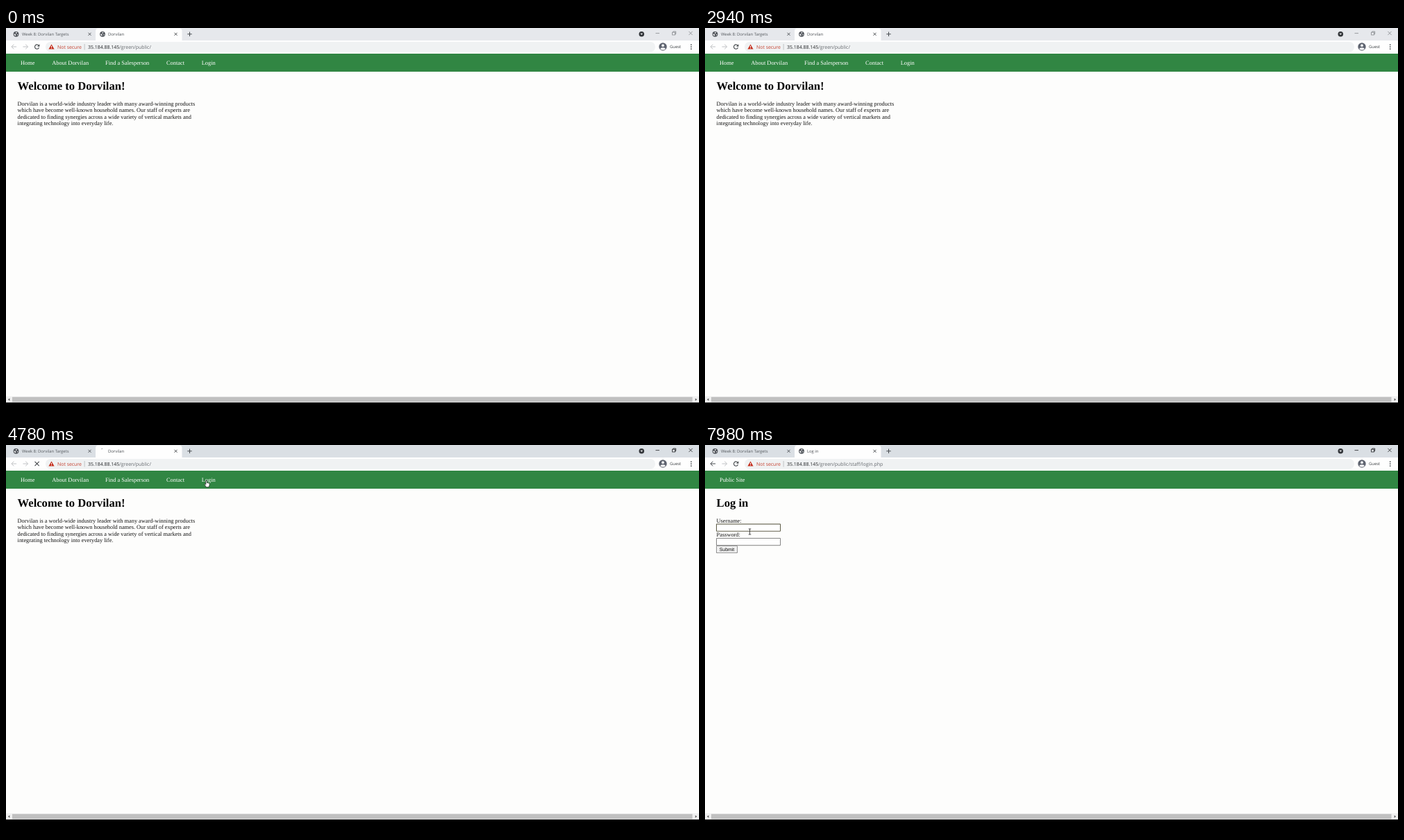
Write an HTML page with a canvas that moves like this. It is 998 px wide and 561 px high and loops after 8000 ms.

```html
<!DOCTYPE html>
<html lang="en">
<head>
<meta charset="utf-8">
<title>Login demo</title>
<style>
  html, body { margin: 0; width: 100%; height: 100%; overflow: hidden; background: #000; }
  canvas { display: block; width: 998px; height: 561px; }
</style>
</head>
<body>
<canvas id="stage" width="998" height="561"></canvas>
<script>
const ctx = document.getElementById('stage').getContext('2d');
ctx.textRendering = 'geometricPrecision';

const LOOP = 8000;
const CLICK = 4700;    // Login is clicked, window takes focus
const LOADED = 5180;   // login page replaces the home page
const HOVER = 6440;    // pointer enters the username field
const BRAND = 'Dorvilan';
const UI = '"Open Sans", "Noto Sans", sans-serif';
const SERIF = '"Liberation Serif", "Times New Roman", serif';
const SANS = '"Liberation Sans", Arial, sans-serif';

// time, x, y of the pointer's hot spot
const PATH = [
  [4400, 330, -10], [4620, 288.5, 51], [5560, 288.5, 51], [6000, 130, 104],
  [6300, 79, 115.5], [6420, 79, 115.5], [6900, 66, 123], [7500, 64.5, 125], [8000, 64.5, 125]
];

function rect(x, y, w, h, fill) {
  ctx.fillStyle = fill;
  ctx.fillRect(x, y, w, h);
}

function round(x, y, w, h, r, fill) {
  ctx.fillStyle = fill;
  ctx.beginPath();
  ctx.roundRect(x, y, w, h, r);
  ctx.fill();
}

function disc(x, y, r, fill) {
  ctx.fillStyle = fill;
  ctx.beginPath();
  ctx.arc(x, y, r, 0, Math.PI * 2);
  ctx.fill();
}

function poly(points, fill, stroke, width = 0.7) {
  ctx.beginPath();
  points.forEach(([x, y]) => ctx.lineTo(x, y));
  ctx.closePath();
  if (fill) { ctx.fillStyle = fill; ctx.fill(); }
  if (stroke) { ctx.strokeStyle = stroke; ctx.lineWidth = width; ctx.stroke(); }
}

function line(color, width, ...points) {
  ctx.strokeStyle = color;
  ctx.lineWidth = width;
  ctx.beginPath();
  points.forEach(([x, y], i) => i ? ctx.lineTo(x, y) : ctx.moveTo(x, y));
  ctx.stroke();
}

function text(str, x, y, size, family, color, weight = 400) {
  ctx.font = `${weight} ${size}px ${family}`;
  ctx.fillStyle = color;
  ctx.fillText(str, x, y);
  return x + ctx.measureText(str).width;
}

function cross(x, y, r, color, width) {
  line(color, width, [x - r, y - r], [x + r, y + r]);
  line(color, width, [x - r, y + r], [x + r, y - r]);
}

function globe(x, y) {
  disc(x, y, 3.9, '#50545a');
  poly([[x - 2.9, y - 0.6], [x - 0.4, y + 0.4], [x - 0.4, y + 1.4], [x - 1, y + 2.8], [x - 2.6, y + 1.4]], '#f2f3f4');
  poly([[x - 0.4, y - 2.9], [x + 1.6, y - 2.4], [x + 1, y - 1.2], [x - 0.6, y - 0.6]], '#f2f3f4');
  poly([[x + 1.2, y + 0.2], [x + 2.9, y + 0.5], [x + 1.9, y + 2.2]], '#f2f3f4');
}

function spinner(x, y, age) {
  const start = -Math.PI / 2 - age * 0.006;
  ctx.strokeStyle = '#8d9196';
  ctx.lineWidth = 0.9;
  ctx.beginPath();
  ctx.arc(x, y, 3.5, start, start + Math.min(0.3 + age * 0.003, 1.6));
  ctx.stroke();
}

function arrow(x, dir, color) {
  const tip = x + dir * 3.6;
  line(color, 1, [x - dir * 3.6, 27], [tip, 27]);
  line(color, 1, [tip - dir * 3.4, 23.7], [tip, 27], [tip - dir * 3.4, 30.3]);
}

function reload(x, y) {
  ctx.strokeStyle = '#45494d';
  ctx.lineWidth = 1.1;
  ctx.beginPath();
  ctx.arc(x, y, 3.1, 0.35, Math.PI * 1.75);
  ctx.stroke();
  poly([[x + 3.8, y - 3.8], [x + 3.8, y - 0.4], [x + 0.4, y - 0.4]], '#45494d');
}

function tabStrip(t, focused, loading, login) {
  const ink = focused ? '#202124' : '#85888c';
  rect(0, 0, 998, 18, focused ? '#dadfe4' : '#e6e8ec');
  round(129, 0.5, 124.5, 20, [4, 4, 0, 0], '#fefefe');
  globe(14.5, 8.8);
  text(`Week 8: ${BRAND} Targets`, 23, 11, 5.9, UI, '#55595e');
  cross(120.5, 8.8, 2, '#45494d', 0.9);
  if (loading) spinner(139, 8.8, t - CLICK);
  else globe(139, 8.8);
  text(login ? 'Log in' : BRAND, 147, 11, 5.9, UI, '#4a4e53');
  cross(244.5, 8.8, 2, '#35393d', 0.9);
  line('#45494d', 1, [261.3, 8.8], [267.7, 8.8]);
  line('#45494d', 1, [264.5, 5.6], [264.5, 12]);

  disc(915.3, 8.7, 3.8, '#35383c');
  poly([[913.5, 7.8], [917.1, 7.8], [915.3, 10.1]], '#f4f5f6');
  line(ink, 0.8, [935.5, 7.6], [941, 7.6]);
  ctx.strokeStyle = ink;
  ctx.lineWidth = 0.8;
  ctx.strokeRect(959.6, 6.2, 3.8, 3.8);
  line(ink, 0.8, [960.8, 6], [960.8, 5], [964.7, 5], [964.7, 8.8], [963.6, 8.8]);
  cross(986, 7.5, 2.6, ink, 0.8);
}

function toolbar(loading, login) {
  rect(0, 18, 998, 19, '#fefefe');
  arrow(11.5, -1, login ? '#45494d' : '#c0c2c5');
  arrow(28, 1, '#c0c2c5');
  if (loading) cross(44.6, 27, 3.1, '#45494d', 1.1);
  else reload(44.6, 27.1);

  round(57, 20, 878, 14.5, 7.2, '#f0f2f3');
  poly([[65.5, 23.4], [69.6, 30.6], [61.4, 30.6]], '#c4301f');
  rect(65, 25.8, 1, 2.3, '#fff');
  rect(65, 28.8, 1, 0.9, '#fff');
  text('Not secure', 74, 29.5, 6.93, UI, '#c4402f');
  rect(112.7, 23, 0.8, 8.5, '#b4b7ba');
  const end = text('35.184.88.145', 118, 29.5, 6.94, UI, '#26282b');
  text(login ? '/green/public/staff/login.php' : '/green/public/', end, 29.5, 6.94, UI, '#666a6f');

  disc(946, 27, 5.7, '#5f6470');
  disc(946, 25.2, 1.9, '#f4f5f6');
  ctx.fillStyle = '#f4f5f6';
  ctx.beginPath();
  ctx.ellipse(946, 30, 3.5, 1.7, 0, 0, Math.PI * 2);
  ctx.fill();
  text('Guest', 956, 29.2, 5.9, UI, '#3c4043');
  for (const y of [24.2, 27.2, 30.2]) disc(986.7, y, 0.85, '#45494d');
}

function navItem(str, x) {
  text(str, x, 53.2, 8.4, SERIF, '#fff');
}

function heading(str) {
  text(str, 16.6, 89.2, 16.6, SERIF, '#000', 700);
}

function homePage() {
  navItem('Home', 21);
  navItem(`About ${BRAND}`, 66.3);
  navItem('Find a Salesperson', 143);
  navItem('Contact', 231);
  navItem('Login', 281.7);
  heading(`Welcome to ${BRAND}!`);
  [
    `${BRAND} is a world-wide industry leader with many award-winning products`,
    'which have become well-known household names. Our staff of experts are',
    'dedicated to finding synergies across a wide variety of vertical markets and',
    'integrating technology into everyday life.'
  ].forEach((row, i) => text(row, 16.6, 112 + i * 9.36, 8.32, SERIF, '#111'));
}

function field(y, border) {
  round(16, y, 93, 11.2, 1, border);
  rect(17, y + 1, 91, 9.2, '#fff');
}

function loginPage(t) {
  navItem('Public Site', 21);
  heading('Log in');
  text('Username:', 16.6, 112, 8.32, SERIF, '#111');
  field(113.6, t >= HOVER ? '#5c5a45' : '#858585');
  text('Password:', 16.6, 132.2, 8.32, SERIF, '#111');
  field(134, '#858585');
  round(16, 145, 31, 11, 1.5, '#7b7b7b');
  round(16.8, 145.8, 29.4, 9.4, 1, '#efefef');
  text('Submit', 20.7, 152.9, 6.93, SANS, '#111');
}

function scrollbar() {
  rect(0, 531.3, 998, 9, '#f0f0f0');
  rect(9, 532.2, 979.5, 7.2, '#c0c0c0');
  poly([[3, 535.8], [5.3, 533.9], [5.3, 537.7]], '#505050');
  poly([[995, 535.8], [992.7, 533.9], [992.7, 537.7]], '#505050');
  rect(0, 540.3, 998, 21, '#000');
}

function pointerAt(t) {
  if (t < PATH[0][0]) return null;
  const i = PATH.findIndex(p => p[0] > t);
  const [t0, x0, y0] = PATH[i - 1], [t1, x1, y1] = PATH[i];
  const k = (t - t0) / (t1 - t0);
  const e = k * k * (3 - 2 * k);
  return [x0 + (x1 - x0) * e, y0 + (y1 - y0) * e];
}

function arrowPointer() {
  poly([[0, 0], [0, 8.6], [2, 6.8], [3.3, 9.8], [4.6, 9.2], [3.3, 6.3], [6, 6.2]], '#fff', '#222');
}

function handPointer() {
  poly([
    [-0.7, 0.2], [0.7, 0.2], [0.9, 3.4], [2.2, 3.5], [3.5, 4], [4.6, 4.7],
    [4.6, 7], [3.7, 8.8], [3.7, 9.8], [-0.4, 9.8], [-0.8, 8.6],
    [-2.7, 5.9], [-2.2, 5], [-0.7, 6]
  ], '#fff', '#222');
}

function beamPointer() {
  line('#222', 0.8, [0, -3.8], [0, 3.8]);
  for (const y of [-4, 4]) line('#222', 0.8, [-1.8, y], [1.8, y]);
}

function pointer(t) {
  const pos = pointerAt(t);
  if (!pos) return;
  ctx.save();
  ctx.translate(...pos);
  if (t >= HOVER) beamPointer();
  else if (t >= 4560 && t < LOADED) handPointer();
  else arrowPointer();
  ctx.restore();
}

function draw(now) {
  const t = now % LOOP;
  const login = t >= LOADED;
  const focused = t >= CLICK;
  const loading = focused && !login;
  tabStrip(t, focused, loading, login);
  toolbar(loading, login);
  rect(0, 37, 998, 26, '#318643');
  rect(0, 63, 998, 469, '#fdfdfc');
  if (login) loginPage(t);
  else homePage();
  scrollbar();
  pointer(t);
  requestAnimationFrame(draw);
}
requestAnimationFrame(draw);
</script>
</body>
</html>
```
